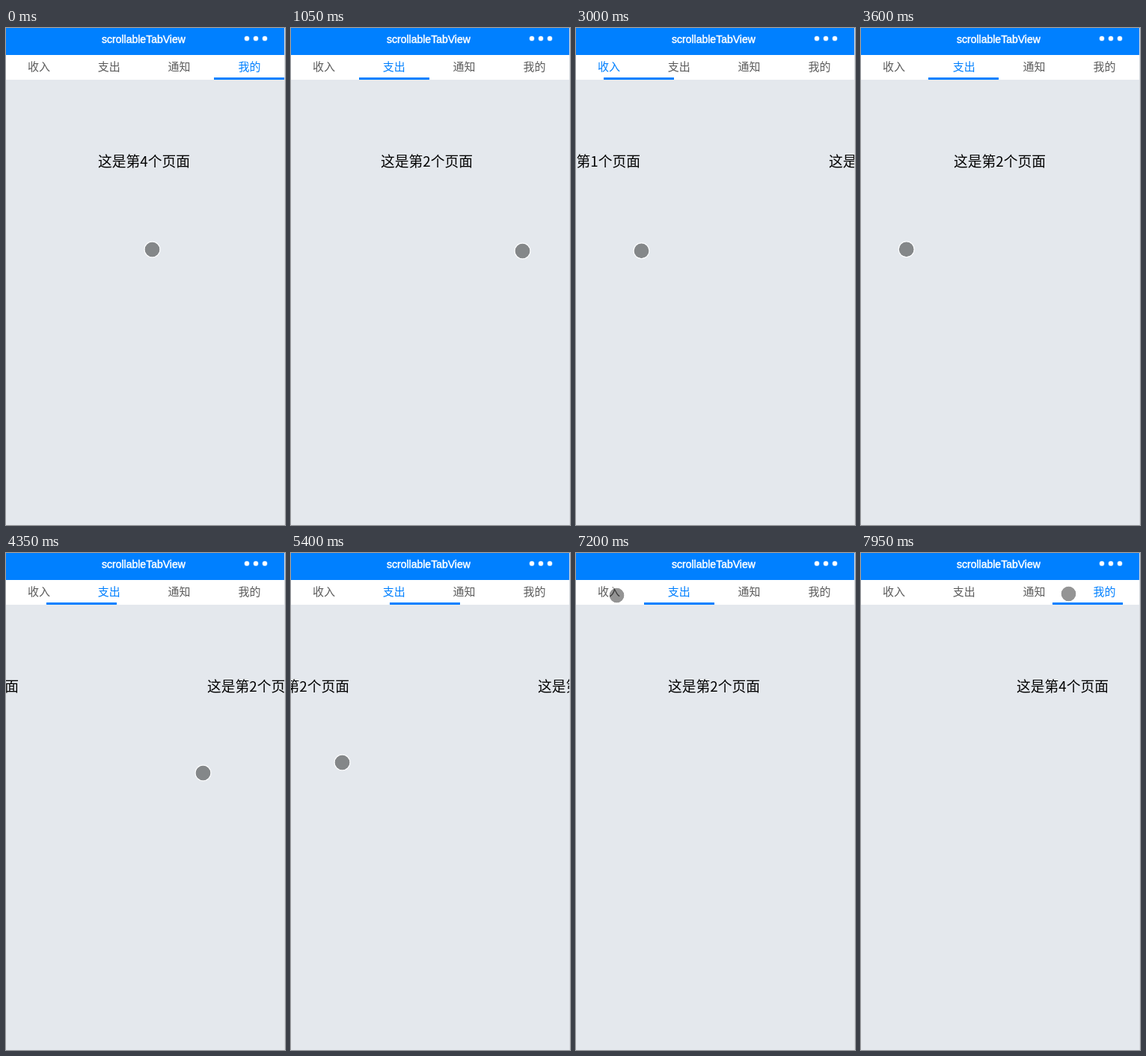
Recreate the animation shown at these times as an HTML page. Size 373x663 px, loop 8 s.

```html
<!DOCTYPE html>
<html lang="zh-CN">
<head>
<meta charset="utf-8">
<title>scrollableTabView</title>
<style>
  html, body { margin: 0; width: 100%; height: 100%; overflow: hidden; }
  #stage { position: relative; width: 373px; height: 663px; overflow: hidden; background: #e4e8ed;
    font-family: "Noto Sans CJK SC", "Noto Sans CJK", sans-serif; font-weight: 350; }
  #stage * { position: absolute; box-sizing: border-box; white-space: nowrap; }
  header { left: 0; top: 0; width: 373px; height: 36px; background: #0080ff; color: #fff; }
  h1 { left: 128px; top: 5px; margin: 0; font: 14px/20px "Liberation Sans", Arial, sans-serif;
    -webkit-text-stroke: .45px #fff; }
  header i { top: 11px; width: 6px; height: 6px; border-radius: 50%; background: #fff;
    box-shadow: 0 0 0 .6px rgba(255,255,255,.4); }
  nav { left: 0; top: 36px; width: 373px; height: 33px; background: #fff; overflow: hidden; }
  nav span { top: 5px; font-size: 15px; line-height: 20px; color: #5c5c5c; }
  nav span.on { color: #0080ff; }
  #bar { left: 0; top: 30px; width: 94px; height: 3px; background: #0080ff; }
  #pages { left: 0; top: 0; }
  #pages p { top: 162px; margin: 0; font-size: 18.75px; line-height: 30px; color: #000; }
  #edge { right: 0; top: 0; width: 1px; height: 663px; background: #d9dce1; }
  #touch { left: -11px; top: -11px; width: 22px; height: 22px; border-radius: 50%;
    border: 1.5px solid rgba(255,255,255,.9); background: rgba(0,0,0,.42) padding-box; }
</style>
</head>
<body>
<div id="stage">
  <div id="pages"></div>
  <header><h1>scrollableTabView</h1></header>
  <nav><div id="bar"></div></nav>
  <div id="edge"></div>
  <div id="touch"></div>
</div>
<script>
const LOOP = 8000, STEP = 150, PAGE = 375, TAB = 93.5;
const SETTLE = 58;   // time constant of the page snapping into place, ms
const LINGER = 230;  // rest of the finger after each gesture, ms
const $ = s => document.querySelector(s);
const mix = (a, b, f) => a + (b - a) * f;
const clamp = f => Math.min(1, Math.max(0, f));

// A swipe drags the page with the finger; a tap is a swipe of no length.
const swipe = (start, end, x0, y0, x1, y1, page) => ({ start, end, x0, y0, x1, y1, page });
const tap = (time, x, y, page) => swipe(time, time, x, y, x, y, page);

const gestures = [
  tap(0, 195.5, 295.5, 3),
  swipe(300, 375, 45, 300, 240, 298, 2),
  swipe(700, 825, 80, 300, 309.5, 297.5, 1),
  swipe(1325, 1475, 40, 313, 328, 303, 0),
  swipe(2100, 3300, 248, 301, 34, 296, 1),
  swipe(3750, 4350, 118, 293.5, 263.5, 293.5, 1),
  swipe(4950, 5400, 236.5, 290, 68.5, 279.5, 2),
  swipe(5900, 6050, 235, 264, 75, 262, 3),
  tap(6450, 241, 54, 2),
  tap(6800, 147, 50, 1),
  tap(7200, 54.5, 56.5, 0),
  tap(7800, 277.5, 54.5, 3)
];

function pageAt(t) {
  let p = 3;
  gestures.forEach((g, i) => {
    if (t < g.start) return;
    const from = i ? gestures[i - 1].page : 3;
    const f = g.end > g.start ? clamp((t - g.start) / (g.end - g.start)) : 1;
    const dragged = from - (g.x1 - g.x0) * f / PAGE;
    p = mix(g.page, dragged, Math.exp(-Math.max(0, t - g.end) / SETTLE));
  });
  return p;
}

function fingerAt(t) {
  const i = gestures.findLastIndex(g => g.start <= t);
  const g = gestures[i], next = gestures[i + 1];
  if (t < g.end) {
    const f = (t - g.start) / (g.end - g.start);
    return [mix(g.x0, g.x1, f), mix(g.y0, g.y1, f)];
  }
  if (!next) return [g.x1, g.y1];
  const leave = g.end + LINGER;
  const f = clamp((t - leave) / (next.start - leave));
  return [mix(g.x1, next.x0, f), mix(g.y1, next.y0, f)];
}

function add(parent, tag, left, text = "") {
  const el = document.createElement(tag);
  el.style.left = left + "px";
  el.textContent = text;
  parent.append(el);
  return el;
}

const tabs = ["收入", "支出", "通知", "我的"].map((name, i) => {
  add($("#pages"), "p", 123 + PAGE * i, `这是第${i + 1}个页面`);
  return add($("nav"), "span", 29 + 93.8 * i, name);
});
for (let i = 0; i < 3; i++) add($("header"), "i", 319 + 12 * i);

const move = (el, x, y = 0) => el.style.transform = `translate(${x}px, ${y}px)`;
const bar = $("#bar"), pages = $("#pages"), touch = $("#touch");

function draw() {
  const t = Math.floor(performance.now() % LOOP / STEP) * STEP;
  const p = pageAt(t);
  move(pages, Math.round(-p * PAGE));
  move(bar, Math.round(p * TAB - 2.9));
  move(touch, ...fingerAt(t));
  tabs.forEach((tab, i) => tab.className = i === Math.round(p) ? "on" : "");
  requestAnimationFrame(draw);
}
draw();
</script>
</body>
</html>
```
